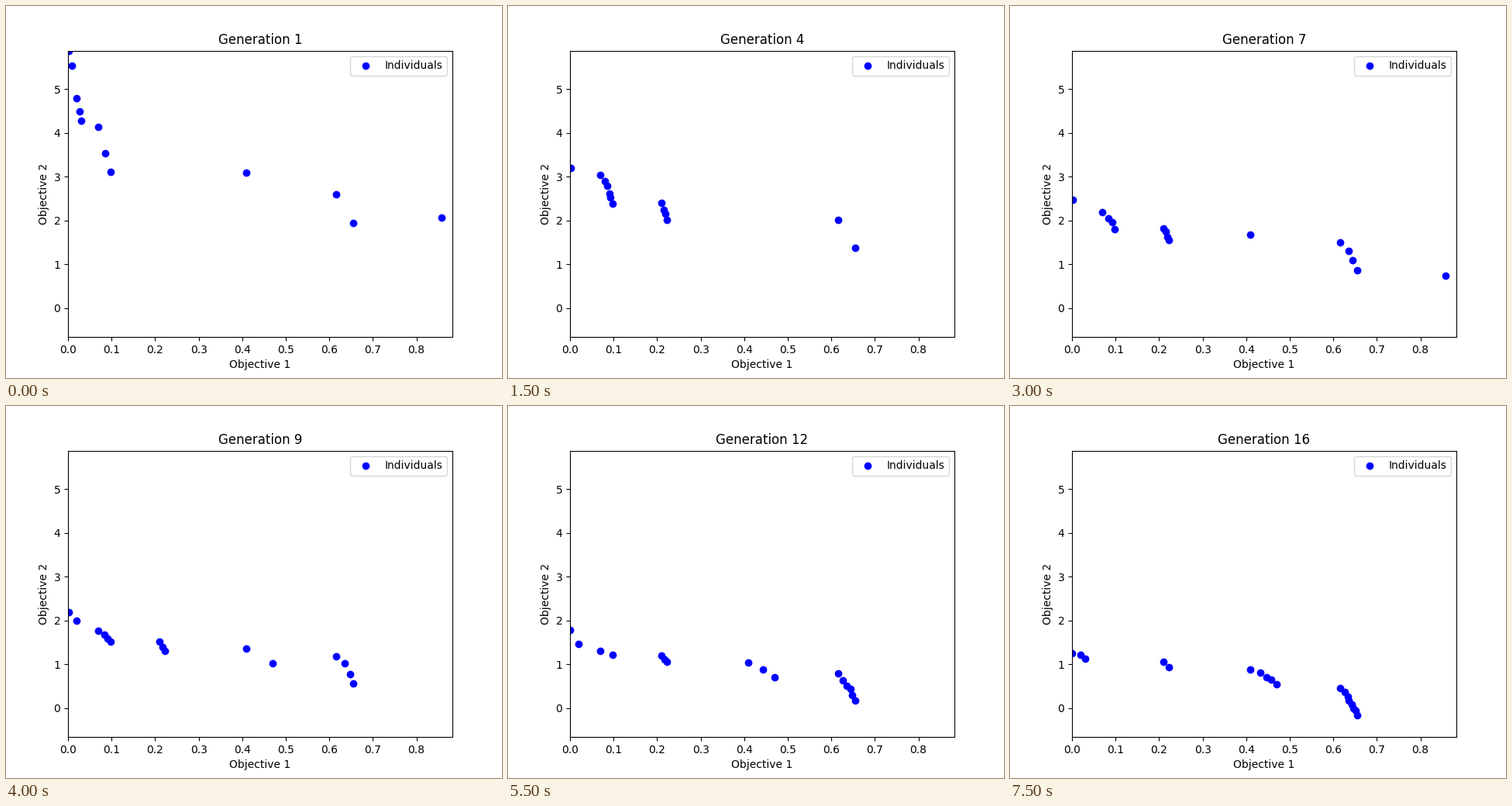
A matplotlib script that plays this animation: 640 by 480 pixels, repeating every 8 s.

```python
import numpy as np
import matplotlib.pyplot as plt
from matplotlib.animation import FuncAnimation

GENERATIONS = 16

# Niches of the front: x range, y range in the first and last generation,
# easing power, and head count at the start, after the first spread, at the end
NICHES = [
    ((.020, .030), (4.79, 4.28), (1.22, 1.13), 2, (3, 0, 2)),
    ((.070, .098), (4.14, 3.11), (1.10, 1.08), 2, (3, 6, 0)),
    ((.210, .222), (3.16, 2.63), (1.06, 0.94), 2, (0, 4, 2)),
    ((.410, .470), (3.09, 2.70), (0.88, 0.55), 2, (1, 0, 5)),
    ((.615, .655), (2.60, 1.95), (0.45, -.16), 1.4, (2, 2, 8)),
]


def spread(rng, n):
    """n ordered fractions from 0 to 1, unevenly spaced inside."""
    q = np.linspace(0, 1, n)
    q[1:-1] += rng.uniform(-0.3, 0.3, max(n - 2, 0)) / n
    return np.sort(q)


def niche_points(niche, done, rng):
    xs, first, last, power, counts = niche
    n = int(round(np.interp(done, (0, 0.2, 1), counts)))
    first, last = np.array(first), np.array(last)
    top, bottom = last + (first - last) * (1 - done) ** power
    x = xs[0] + (xs[1] - xs[0]) * spread(rng, n) ** 0.7
    y = top + (bottom - top) * spread(rng, n)
    return np.column_stack([x, y])


def population(gen):
    rng = np.random.default_rng(gen)
    done = (gen - 1) / (GENERATIONS - 1)
    left = 1 - done
    groups = [niche_points(niche, done, rng) for niche in NICHES]

    # Best in objective 1: a quick drop, then a steady descent
    edge = 1.25 + 2 * left + 2.62 * left ** 9
    groups.append([(0.002 * left, edge)])
    if gen < 3:
        groups.append([(0.009, edge - 0.34)])

    # The far right outlier comes and goes, then dies out
    if gen < 9 and (gen - 1) % 5 < 3:
        groups.append([(0.858, 2.07 * left ** 2)])
    return np.vstack(groups)


fig, ax = plt.subplots(figsize=(6.4, 4.8), dpi=100)
dots = ax.scatter([], [], c="blue", label="Individuals")
ax.set_xlim(0, 0.8827)
ax.set_ylim(-0.66, 5.88)
ax.set_xlabel("Objective 1")
ax.set_ylabel("Objective 2")
ax.legend(loc="upper right")
title = ax.set_title("Generation 1")


def update(i):
    dots.set_offsets(population(i + 1))
    title.set_text(f"Generation {i + 1}")
    return dots, title


anim = FuncAnimation(fig, update, frames=GENERATIONS, interval=500,
                     repeat=True, repeat_delay=0)
plt.show()
```
